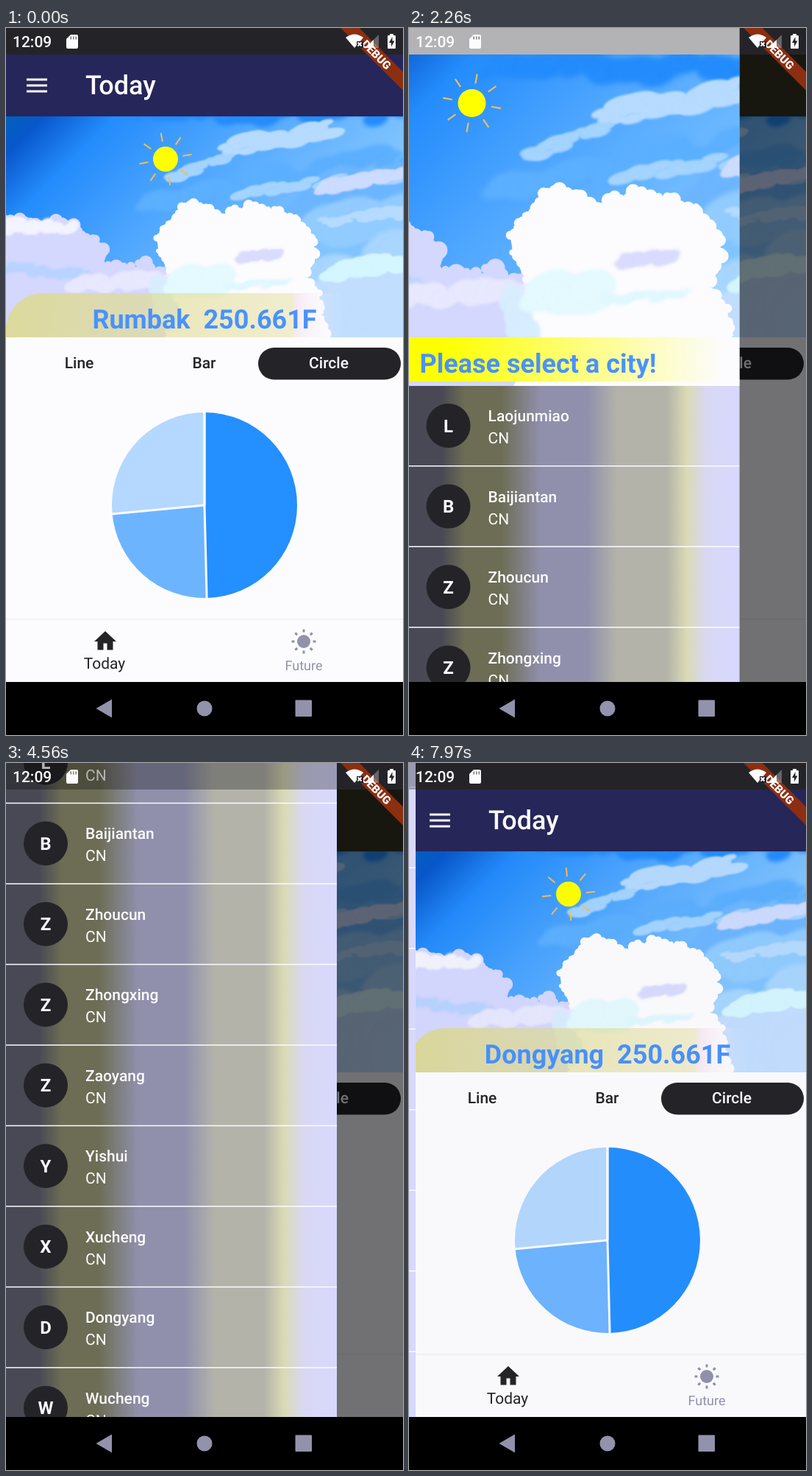
An HTML page with a canvas that plays this animation: 540 px wide and 960 px high, repeating every 8000 ms.

```html
<!DOCTYPE html>
<html lang="en">
<head>
<meta charset="utf-8">
<style>
html, body { margin: 0; width: 100%; height: 100%; overflow: hidden; background: #000; }
canvas { display: block; }
</style>
</head>
<body>
<canvas id="stage" width="540" height="960"></canvas>
<script>
const LOOP = 8000, ROW = 109.5, DRAWER = 450;
const INK = '#242428', GREY = '#9292ac', PAPER = '#fcfcff', BLUE = '#4992fc';
const CITIES = ['Laojunmiao', 'Baijiantan', 'Zhoucun', 'Zhongxing', 'Zaoyang', 'Yishui',
  'Xucheng', 'Dongyang', 'Wucheng', 'Wenling', 'Taozhuang', 'Tangjiazhuang'];
const ctx = document.getElementById('stage').getContext('2d');
ctx.textRendering = 'geometricPrecision';

function rect(color, x, y, w, h, radius = 0) {
  ctx.fillStyle = color;
  ctx.beginPath();
  ctx.roundRect(x, y, w, h, radius);
  ctx.fill();
}
function disc(color, x, y, r) {
  ctx.fillStyle = color;
  ctx.beginPath();
  ctx.arc(x, y, r, 0, 7);
  ctx.fill();
}
function shape(color, d) {
  ctx.fillStyle = color;
  ctx.fill(new Path2D(d));
}
function text(str, x, y, size, weight, color, align = 'left') {
  ctx.font = `${weight} ${size}px Roboto, sans-serif`;
  ctx.fillStyle = color;
  ctx.textAlign = align;
  ctx.fillText(str, x, y);
}
function sun(x, y, r, rayIn, rayOut, turn, color, rayColor, width) {
  ctx.strokeStyle = rayColor;
  ctx.lineWidth = width;
  ctx.beginPath();
  for (let i = 0; i < 8; i++) {
    const a = turn + i * Math.PI / 4, c = Math.cos(a), s = Math.sin(a);
    ctx.moveTo(x + c * rayIn, y + s * rayIn);
    ctx.lineTo(x + c * rayOut, y + s * rayOut);
  }
  ctx.stroke();
  disc(color, x, y, r);
}
function ramp(width, stops) {
  const g = ctx.createLinearGradient(0, 0, width, 0);
  stops.forEach(([at, color]) => g.addColorStop(at, color));
  return g;
}

// The cloudy sky is painted once, at double size, for both headers.
const SKY_H = 337;
function paintSky() {
  const sky = document.createElement('canvas');
  sky.width = 1080;
  sky.height = SKY_H * 2;
  const c = sky.getContext('2d');
  let seed = 7;
  const random = () => (seed = seed * 16807 % 2147483647) / 2147483647;
  c.scale(2, 2);
  c.translate(0, -101.5);

  const puffs = (color, x0, y0, x1, y1, r, flat = 1, n = 30) => {
    c.fillStyle = color;
    for (let i = 0; i < n; i++) {
      const k = i / (n - 1), size = r * (.4 + .7 * random());
      c.beginPath();
      c.ellipse(x0 + (x1 - x0) * k, y0 + (y1 - y0) * k + (random() - .5) * r,
        size, size * flat, flat < 1 ? -.25 : 0, 0, 7);
      c.fill();
    }
  };
  // A filled outline whose edge is made of small puffs.
  const cloud = (color, r, outline) => {
    const points = outline.split(' ').map(p => p.split(',').map(Number));
    c.fillStyle = color;
    c.beginPath();
    points.forEach(p => c.lineTo(...p));
    c.fill();
    points.slice(1).forEach((p, i) => puffs(color, ...points[i], ...p, r, 1, 5));
  };

  const g = c.createLinearGradient(0, 100, 300, 400);
  g.addColorStop(0, '#0064b4');
  g.addColorStop(.12, '#0858cc');
  g.addColorStop(.28, '#248cfc');
  g.addColorStop(.55, '#4aa4ff');
  g.addColorStop(1, '#80c4ff');
  c.fillStyle = g;
  c.fillRect(0, 100, 540, 340);

  c.filter = 'blur(6px)';
  puffs('#248cfc', 180, 112, 540, 115, 20, .6);
  puffs('#5cb0ff', 190, 240, 540, 170, 24, .5);
  puffs('#6db6ff', 400, 240, 540, 220, 40, .6);
  puffs('#92ccff', 420, 275, 540, 250, 34, .5);
  puffs('#a8d6ff', 430, 350, 540, 300, 34, .6);
  puffs('#c2deff', 430, 400, 540, 390, 45);
  c.filter = 'blur(2px)';
  puffs('#a4d4ff', 225, 205, 320, 165, 11, .45);
  puffs('#b6dbff', 300, 164, 445, 136, 20, .4);
  puffs('#a4d4ff', 320, 222, 540, 200, 16, .4);
  puffs('#ccdcff', 430, 218, 540, 195, 14, .4);
  puffs('#b6dbff', 430, 262, 540, 250, 12, .4);
  puffs('#d4f6ff', 440, 332, 540, 318, 18, .5);

  c.filter = 'none';
  cloud('#d4d8ff', 9, '0,262 25,260 40,270 60,267 92,264 98,280 118,288 132,300 128,320 150,328 190,322 215,332 240,440 0,440');
  cloud(PAPER, 7, '205,285 217,270 230,264 239,245 255,237 272,246 290,259 305,250 330,244 365,246 378,258 394,260 404,277 418,288 420,304 408,325 410,345 426,362 430,395 440,440 215,440 222,400 212,370 222,335 220,315 207,300');
  c.filter = 'blur(3px)';
  puffs('#f4f4ff', 0, 268, 92, 272, 9);
  puffs('#b8d4ff', 0, 325, 110, 335, 10, .5);
  puffs('#e8e8ff', 90, 350, 215, 340, 14, .7);
  puffs('#d8eeff', 205, 345, 225, 400, 14, .8);
  puffs('#e4faff', 232, 345, 290, 340, 22, .6);
  puffs('#dadcff', 318, 312, 372, 306, 10, .6);
  puffs('#e0f8ff', 300, 350, 385, 345, 7, .5);
  return sky;
}
const sky = paintSky();

function pie() {
  const edges = [-90, 88.6, 174.6, 270].map(a => a * Math.PI / 180);
  const colors = ['#248fff', '#6db4ff', '#b4d8ff'];
  ctx.strokeStyle = PAPER;
  ctx.lineWidth = 3;
  colors.forEach((color, i) => {
    ctx.beginPath();
    ctx.moveTo(270, 648);
    ctx.arc(270, 648, 126, edges[i], edges[i + 1]);
    ctx.fillStyle = color;
    ctx.fill();
  });
  edges.forEach(a => {
    ctx.beginPath();
    ctx.moveTo(270, 648);
    ctx.lineTo(270 + 127 * Math.cos(a), 648 + 127 * Math.sin(a));
    ctx.stroke();
  });
}

function page(city, turn, open) {
  rect(PAPER, 0, 0, 540, 888);
  ctx.save();
  ctx.beginPath();
  ctx.rect(0, 120, 540, 300);
  ctx.clip();
  ctx.drawImage(sky, 0, 101.5, 540, SKY_H);
  sun(217, 178, 17, 24, 36, turn, '#ff0', '#f8bc55', 2);
  rect(ramp(540, [[0, 'rgba(222,218,130,.8)'], [.72, 'rgba(228,222,160,.5)'],
    [.735, 'rgba(240,210,230,.4)'], [.85, 'rgba(255,255,255,0)']]), 0, 360, 540, 110, 50);
  ctx.restore();
  text(city + '  250.661F', 270, 408, 36, 700, BLUE, 'center');

  rect(INK, 343, 434, 194, 43.5, 21.75);
  text('Line', 99.5, 462, 21, 500, INK, 'center');
  text('Bar', 269.5, 462, 21, 500, INK, 'center');
  text('Circle', 439, 462, 21, 500, PAPER, 'center');
  pie();

  rect('#f0f0fa', 0, 802, 540, 1.5);
  shape(INK, 'M135 819L150 833h-4.5v11.5h-8v-9h-5v9h-8v-11.5h-4.5z');
  text('Today', 134, 870, 21, 400, INK, 'center');
  sun(405, 833, 9, 12.5, 16.5, 0, GREY, GREY, 3);
  text('Future', 405, 872, 18, 400, GREY, 'center');

  rect(open > .1 ? '#343424' : '#26265a', 0, 36, 540, 84);
  rect(INK, 0, 0, 540, 36);
  for (const y of [69, 77, 85]) rect(PAPER, 28, y - .5, 28, 3);
  text('Today', 108, 90, 36, 500, PAPER);
}

function drawer(left, scroll, turn) {
  ctx.save();
  ctx.translate(left, 0);
  ctx.beginPath();
  ctx.rect(0, 0, DRAWER, 888);
  ctx.clip();
  rect(PAPER, 0, 0, DRAWER, 888);
  ctx.translate(0, -scroll);
  ctx.drawImage(sky, -135.7, 36, 721.4, 450);
  rect(PAPER, 0, 0, DRAWER, 36);
  sun(86, 102, 19, 27, 40, turn, '#ff0', '#f8bc55', 2.2);
  rect(ramp(DRAWER, [[0, '#ff0'], [.1, '#ff0'], [.95, PAPER]]), 0, 420, DRAWER, 60);
  text('Please select a city!', 15, 468, 36, 700, BLUE);

  rect(ramp(DRAWER, [[0, '#494955'], [.1, '#494955'], [.17, '#6d6d55'], [.28, '#6d6d55'],
    [.4, '#9090ac'], [.54, '#9090ac'], [.63, '#b3b3aa'], [.78, '#b3b3aa'],
    [.84, '#dadab4'], [.9, '#d8d8f4'], [1, '#d8d8ff']]),
    0, 486, DRAWER, ROW * CITIES.length + 500);
  CITIES.forEach((city, i) => {
    const y = 486 + i * ROW;
    disc(INK, 54, y + 54, 30);
    text(city[0], 54, y + 62.5, 24, 700, PAPER, 'center');
    text(city, 108, y + 48, 21, 500, PAPER);
    text('CN', 108, y + 78, 21, 400, PAPER);
    rect(PAPER, 0, y + ROW - 1.5, DRAWER, 1.5);
  });
  ctx.translate(0, scroll);
  rect('rgba(0,0,0,.29)', 0, 0, DRAWER, 36);
  ctx.restore();
}

function banner() {
  ctx.save();
  ctx.translate(540, 0);
  ctx.rotate(Math.PI / 4);
  rect('#8c2e10', -62, 42, 124, 18);
  text('DEBUG', 0, 56.5, 15.3, 900, PAPER, 'center');
  ctx.restore();
}

function systemBars() {
  text('12:09', 9, 26, 21, 500, PAPER);
  shape(PAPER, 'M88 9h8q2 0 2 2v15q0 2-2 2h-12q-2 0-2-2v-11z');
  for (const x of [87.5, 91, 94.5]) rect('#77776c', x, 11.5, 1.5, 4);
  shape(PAPER, 'M474 27L462 13Q474 4 486 13z');
  rect(INK, 477, 18, 9, 9);
  ctx.strokeStyle = PAPER;
  ctx.lineWidth = 2;
  ctx.stroke(new Path2D('M478.5 19.5l5 5m0-5l-5 5'));
  shape('rgba(255,255,255,.3)', 'M507 9V27H489z');
  shape(PAPER, 'M500 16V27H489z');
  rect(PAPER, 519, 10, 11, 18, 1);
  rect(PAPER, 522, 8, 5, 3);
  shape(INK, 'M525.5 12l-4.5 8h3v5.5l4.5-8h-3z');

  rect('#000', 0, 888, 540, 72);
  shape(GREY, 'M122.5 924L144 911.500V936.500z');
  disc(GREY, 270, 924, 10.5);
  rect(GREY, 393.5, 912.5, 22.5, 22.5, 1);
}

// Critically damped spring from 0 to 1, time in ms.
function settle(ms) {
  const s = ms / 1000, w = 22.36;
  if (s <= 0) return 0;
  return Math.min(1, Math.max(0, 1.01 - Math.exp(-w * s) * (1.01 + (1.01 * w - 1) * s)));
}
const openness = t => t < 7800 ? settle(t - 1970.5) : 1 - settle(t - 7733);

function scrollAt(t) {
  const part = (from, to) => Math.min(1, Math.max(0, (t - from) / (to - from)));
  if (t < 3480) return 390 * part(3140, 3310) ** 1.3;
  return 469 + 421.5 * (1 - (1 - part(4530, 4880)) ** 2);
}

function draw(t) {
  const open = openness(t);
  const turn = (-10 + 45 * t / 1560) * Math.PI / 180;
  ctx.clearRect(0, 0, 540, 960);
  page(t < 7800 ? 'Rumbak' : 'Dongyang', turn, open);
  if (open > 0) {
    rect(`rgba(0,0,0,${.55 * open})`, 0, 36, 540, 852);
    drawer((open - 1) * DRAWER, scrollAt(t), turn);
  }
  banner();
  systemBars();
}

const start = performance.now();
function tick() {
  draw((performance.now() - start) % LOOP);
  requestAnimationFrame(tick);
}
tick();
</script>
</body>
</html>
```
